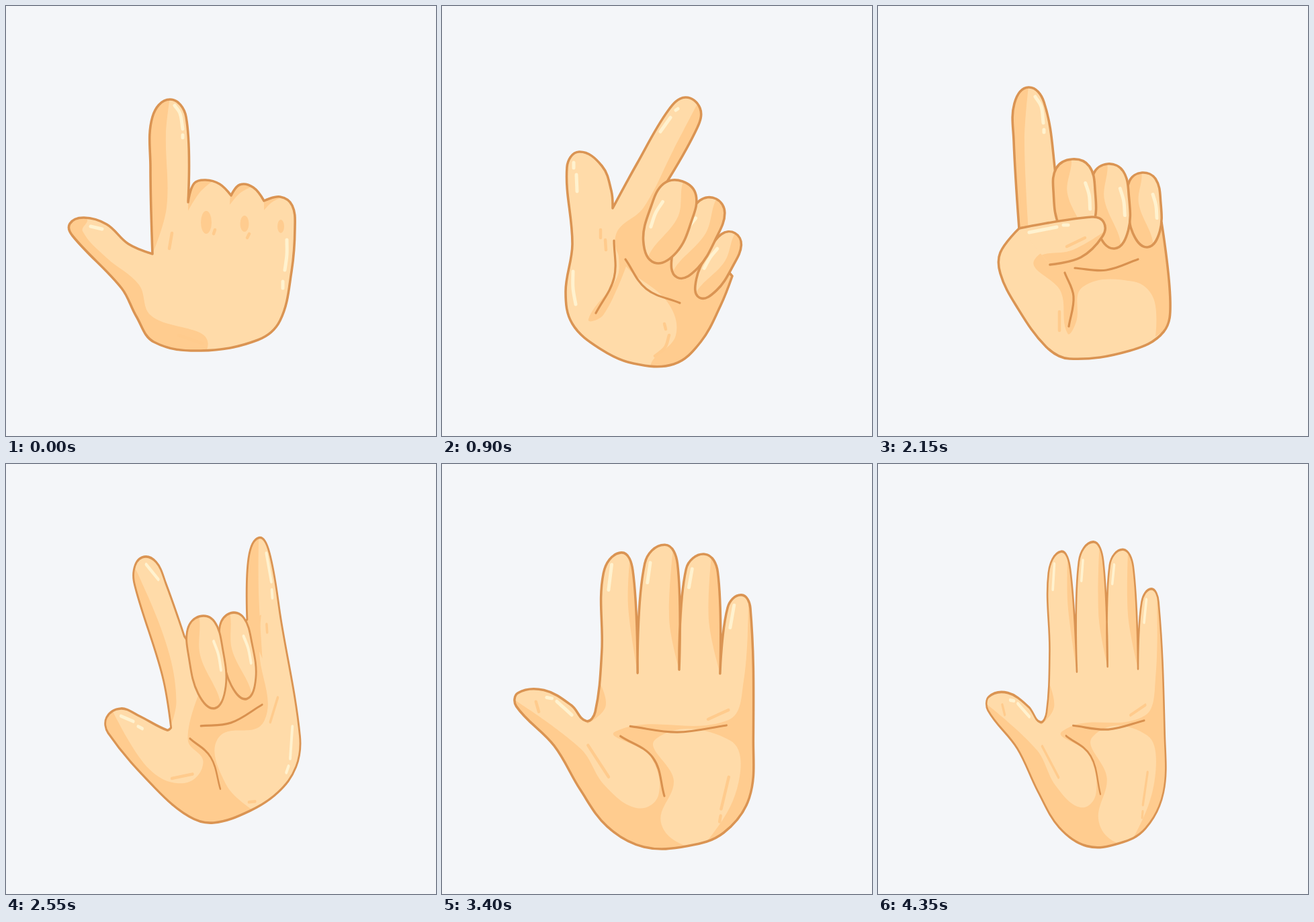
These frames come from a looping animation (640 by 640 pixels, 4400 ms). An HTML page:

```html
<!DOCTYPE html>
<html lang="en">
<head>
<meta charset="utf-8">
<title>Hand gestures</title>
<style>
  html, body { margin: 0; width: 100%; height: 100%; overflow: hidden; background: #f4f6f9; }
  svg { display: block; width: 100%; height: 100%; }
  path { fill: none; stroke-linecap: round; stroke-linejoin: round; }
  .skin { fill: #ffdba9; }
  .shade { fill: #ffcc8f; }
  .edge { stroke: #da9453; stroke-width: 3.6; }
  .line { stroke: #d9914f; stroke-width: 3.2; }
  .soft { stroke: #ffcb8d; stroke-width: 4.5; }
  .glow { stroke: #fff2cf; stroke-width: 5; }
</style>
</head>
<body>
<svg id="stage" viewBox="0 0 640 640"></svg>
<script>
const LOOP = 4400, STEP = 50;
const stage = document.getElementById('stage');
let clipCount = 0;

// Smooth curve through "x,y" points; a trailing "!" makes a corner.
function curve(text, closed = true) {
  const points = text.split(' ').map(p => {
    const [x, y] = p.replace('!', '').split(',').map(Number);
    return { x, y, sharp: p.endsWith('!') };
  });
  const n = points.length;
  const at = i => closed ? points[(i + n) % n] : points[Math.min(n - 1, Math.max(0, i))];
  const handle = (i, side) => {
    const p = at(i), prev = at(i - 1), next = at(i + 1), end = at(i + side);
    const span = Math.hypot(next.x - prev.x, next.y - prev.y);
    if (p.sharp || !span) return `${p.x},${p.y}`;
    const reach = side * .36 * Math.hypot(end.x - p.x, end.y - p.y) / span;
    return `${p.x + (next.x - prev.x) * reach},${p.y + (next.y - prev.y) * reach}`;
  };
  let d = `M${points[0].x},${points[0].y}`;
  for (let i = 0; i < (closed ? n : n - 1); i++) {
    d += `C${handle(i, 1)} ${handle(i + 1, -1)} ${at(i + 1).x},${at(i + 1).y}`;
  }
  return closed ? d + 'Z' : d;
}

const path = (kind, d) => `<path class="${kind}" d="${d}"/>`;
const shade = text => path('shade', curve(text));
const patch = text => path('skin', curve(text));
const strokes = kind => (...lines) => lines.map(text => path(kind, curve(text, false))).join('');
const line = strokes('line'), soft = strokes('soft'), glow = strokes('glow');
const spot = (x, y, rx, ry) => `<ellipse class="shade" cx="${x}" cy="${y}" rx="${rx}" ry="${ry}"/>`;

// An outlined shape with shading clipped to it.
function part(text, inside = '', closed = true) {
  const d = curve(text, closed), id = 'clip' + clipCount++;
  return `<clipPath id="${id}"><path d="${d}"/></clipPath>` + path('skin', d) +
    `<g clip-path="url(#${id})">${inside}</g>` + path('edge', d);
}

// A folded finger from knuckle to tip; side 1 shades its left, -1 its right.
function curl(x, y, tipX, tipY, width, side) {
  const dx = tipX - x, dy = tipY - y, k = width / Math.hypot(dx, dy);
  const place = list => list.map(([u, v]) => `${x + dx * u - dy * k * v},${y + dy * u + dx * k * v}`).join(' ');
  const flank = [[.1, .4], [.4, .5], [.8, .41]];
  const outline = [[0, 0], ...flank, [1, 0], ...flank.map(([u, v]) => [u, -v]).reverse()];
  const dark = [[-.1, .1], [.4, .17], [1.1, -.1], [1.1, 1], [-.1, 1]].map(([u, v]) => [u, v * side]);
  const shine = [[.3, .28], [.45, .35], [.62, .35]].map(([u, v]) => [u, -v * side]);
  return part(place(outline), shade(place(dark))) + glow(place(shine));
}

const backPoint = () =>
  part('218,369! 215,240 218,165 244,139 268,165 271,292! 280,264 297,259 318,265 335,282! 348,266 368,270 384,290! 408,284 426,297 430,330 425,395 408,468 375,497 290,513 220,500 194,462 172,420 99,342 95,324 116,315 150,325 182,354',
    shade('210,369! 210,140! 244,136! 238,190 239,300 218,369!') +
    shade('271,305! 271,256! 308,260! 288,278') +
    shade('333,296! 335,264! 368,268! 349,278') +
    shade('384,304! 384,282! 412,284! 396,292') +
    shade('88,312! 120,317 114,335 150,375 198,415 215,460 300,508 200,525! 85,350!') +
    spot(298, 322, 8, 17) + spot(355, 324, 6.5, 12) + spot(409, 328, 5, 10)) +
  soft('247,338 243,361', '311,333 309,339', '362,339 359,345', '257,490 292,502') +
  glow('251,148 259,160 263,183', '263,192 263,196', '418,348 418,370 415,393', '412,410 412,420', '126,328 143,332');

const palmPoint = () =>
  part('254,301! 290,235 337,155 362,136 384,152 380,181 329,271! 370,330! 432,402! 415,445 385,500 345,533 285,532 235,510 194,473 184,425 194,355 186,240 204,217 238,238 252,275',
    shade('383,140! 345,213 300,300 259,340 272,385 335,440 348,490 310,540 350,550! 460,400! 400,250!') +
    shade('257,345! 262,400 218,466 240,460 275,385!')) +
  curl(436, 338, 383, 434, 42, -1) +
  curl(408, 287, 350, 404, 52, -1) +
  curl(358, 261, 316, 382, 64, -1) +
  line('256,349 256,405 229,457', '273,377 304,421 354,442') +
  soft('236,333 236,345', '243,348 244,363', '331,473 333,481', '338,490 332,508 317,521') +
  glow('340,166 325,187', '348,155 351,153', '196,233 196,241', '200,251 201,276', '195,395 195,420 199,444');

const fist = () =>
  part('187,331! 168,360 170,410 183,455 225,495 275,520 300,518 375,492 445,451 460,415 445,358 417,303! 300,250!',
    shade('417,290! 480,400! 455,460! 434,450 430,400 400,377 306,408 328,465 315,474 262,436 218,405 240,350 330,250!')) +
  curl(363, 216, 398, 323, 55, 1) +
  curl(311, 222, 348, 345, 57, 1) +
  curl(250, 238, 294, 367, 60, 1) +
  curl(201, 264, 222, 360, 68, 1) +
  curl(255, 330, 252, 386, 36, 1) +
  part('187,331! 264,286 283,290 287,315 262,350 237,372 238,399!',
    shade('284,282! 280,320 225,365 220,405! 242,405! 300,310!'), false) +
  line('292,384 350,375 399,347', '282,419 310,439 323,471') +
  soft('270,449 300,466') +
  glow('209,328 256,302', '264,297 272,293', '208,466 248,494', '258,501 266,504');

const indexUp = () =>
  part('210,331! 182,367 182,398 205,445 250,507 285,525 375,513 425,485 435,440 422,322! 300,260!',
    shade('422,310! 445,470! 413,492! 410,435 380,410 305,418 295,470 282,487 272,425 234,376 330,350!')) +
  part('210,331! 202,200 203,145 224,121 247,143 263,240 267,322!',
    shade('195,335! 195,115! 224,120! 218,200 224,335!')) +
  curl(393, 248, 401, 359, 49, 1) +
  curl(342, 235, 352, 361, 55, 1) +
  curl(289, 228, 297, 350, 62, 1) +
  part('210,331! 318,314 336,322 334,343 302,374 256,385!',
    shade('345,330! 290,363 234,376 256,390! 330,375!'), false) +
  line('293,390 340,393 387,377', '278,397 291,432 284,477') +
  soft('281,358 308,345', '270,455 270,483') +
  glow('234,135 243,150 246,174', '247,184 247,188', '225,337 266,329', '276,326 283,326');

const horns = () =>
  part('232,388! 222,310 183,180 181,150 198,132 224,141 240,175 268,255! 300,300! 388,240! 398,150 420,121 438,145 452,250 473,420 462,465 425,500 370,523 300,535 255,522 195,475 113,386 112,363 140,352 172,365 224,391',
    shade('170,130! 188,155 235,270 245,350 228,392!') +
    shade('290,340! 262,408 288,445 250,472 185,445 122,350! 90,370! 200,500! 300,545! 375,522! 328,480 318,412 408,392 407,290 415,235! 300,280! 268,250!') +
    shade('385,240! 395,118! 420,118! 413,200 412,300!')) +
  curl(357, 228, 378, 357, 58, 1) +
  curl(299, 228, 317, 366, 65, 1) +
  line('288,390 345,390 406,368', '266,407 303,438 317,486') +
  soft('436,360 419,395', '424,250 424,262', '227,463 267,460', '369,510 381,510') +
  glow('205,143 226,167', '139,363 162,373', '170,381 178,385', '432,145 438,188', '438,200 438,212', '460,405 452,452', '448,463 443,472');

const openPalm = () =>
  part('192,385 186,295 168,180 189,145 211,168 245,317! 227,155 252,122 276,147 306,301! 290,152 314,125 338,148 368,296! 362,197 379,175 396,192 435,385 444,470 415,528 365,557 300,570 240,550 190,503 140,446 73,398 72,378 110,367 155,382 181,401',
    shade('203,145! 213,220 245,317! 218,150!') +
    shade('265,120! 278,230 306,301! 285,125!') +
    shade('324,122! 337,220 368,296! 346,130!') +
    shade('190,340! 206,375 183,405!') +
    shade('390,175! 405,300 392,362 228,408 285,435 308,490 280,515 225,490 180,443 66,388! 120,560! 320,600! 470,520! 440,350!') +
    patch('290,408 400,391 424,450 395,540 366,558 319,530 327,465')) +
  line('248,397 320,393 391,370', '236,414 290,437 317,490') +
  soft('408,445 405,494', '406,504 406,513', '362,366 390,347', '190,436 229,477', '101,386 108,400') +
  glow('178,165 180,203', '235,152 236,182', '299,150 299,178', '371,192 371,226', '132,380 158,396', '116,377 124,377');

// start, moment of rest, end, opening tilt, closing tilt, pivot
const gestures = [
  [backPoint, 0, 0, 500, 0, 24, 310, 510],
  [palmPoint, 500, 900, 1250, 22, -22, 310, 530],
  [fist, 1250, 1650, 1880, -9, 12, 300, 515],
  [indexUp, 1880, 2150, 2480, 9, -7, 310, 520],
  [horns, 2480, 2950, 3300, -5, 13, 300, 530],
  [openPalm, 3300, 3700, 4425, 12, 8, 300, 570]
].map(([art, start, rest, end, from, to, x, y]) => ({ art: art(), start, rest, end, from, to, x, y }));

stage.innerHTML = gestures.map(g => `<g>${g.art}</g>`).join('');
gestures.forEach((g, i) => { g.node = stage.children[i]; });

const smooth = u => { u = Math.min(1, Math.max(0, u)); return u * u * (3 - 2 * u); };

function draw(time) {
  for (const { node, start, rest, end, from, to, x, y } of gestures) {
    const visible = time >= start && time < end;
    node.style.display = visible ? '' : 'none';
    if (!visible) continue;
    const tilt = time < rest
      ? from * (1 - smooth((time - start) / (rest - start)))
      : to * smooth((time - rest) / (end - rest));
    // The hand narrows as it turns from one gesture to the next.
    const opened = start ? smooth((time - start) / 110) : 1;
    const closing = smooth((end - time) / 130);
    const squash = .7 * (1 - Math.min(opened, closing));
    node.setAttribute('transform',
      `translate(${x + 40 * squash} ${y - 5 * squash}) scale(${1 - squash} ${1 + .02 * squash}) rotate(${tilt}) translate(${-x} ${-y})`);
  }
}

const began = performance.now();
function tick() {
  const time = (performance.now() - began) % LOOP;
  draw(Math.floor(time / STEP) * STEP);
  requestAnimationFrame(tick);
}
tick();
</script>
</body>
</html>
```
